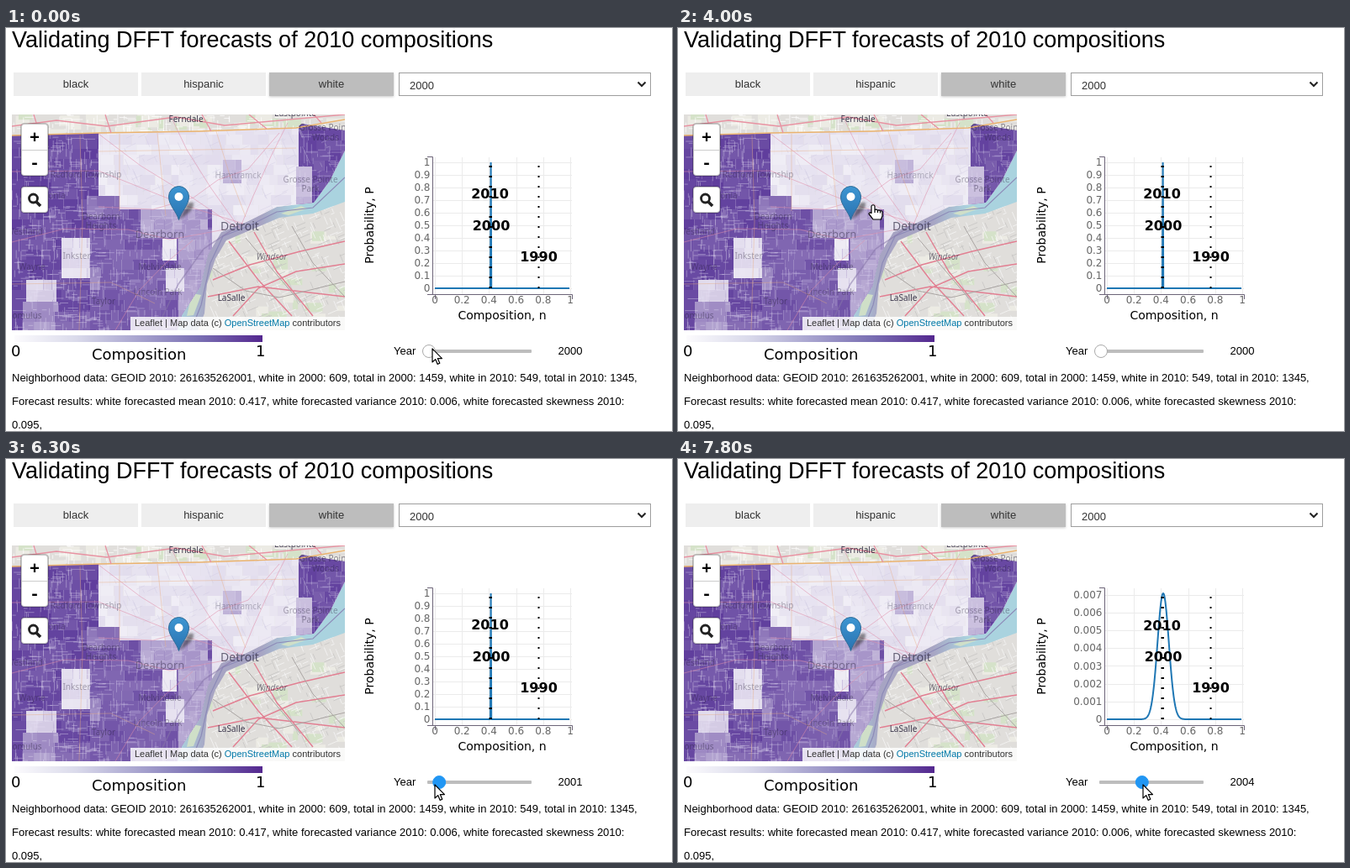
An HTML page with a canvas that plays this animation: 792 px wide and 480 px high, repeating every 8000 ms.

```html
<!DOCTYPE html>
<html lang="en">
<head>
<meta charset="utf-8">
<title>Validating DFFT forecasts</title>
<style>
html, body { margin: 0; width: 100%; height: 100%; overflow: hidden; background: #fff; }
canvas { position: absolute; left: 7px; top: 103px; }
svg { position: absolute; left: 0; top: 0; font: 13px "Liberation Sans", Arial, sans-serif; }
.dj { font-family: "DejaVu Sans", sans-serif; }
.mid { text-anchor: middle; }
.tick { font-size: 12px; fill: #666; }
.mark { font-weight: bold; font-size: 16px; text-anchor: middle; }
.place { font-family: "Noto Sans", sans-serif; text-anchor: middle; }
.btn { fill: #333; text-anchor: middle; }
</style>
</head>
<body>
<canvas id="map" width="396" height="257"></canvas>
<svg width="792" height="480" viewBox="0 0 792 480">
  <defs>
    <linearGradient id="scale"><stop stop-color="#fcfbfd"/><stop offset=".25" stop-color="#dadaeb"/>
      <stop offset=".5" stop-color="#a8a4cf"/><stop offset=".75" stop-color="#796eb2"/><stop offset="1" stop-color="#54278f"/></linearGradient>
    <linearGradient id="pin" x2="0" y2="1"><stop stop-color="#3d96d2"/><stop offset="1" stop-color="#2a72b0"/></linearGradient>
    <filter id="soft" x="-50%" y="-50%" width="200%" height="200%"><feGaussianBlur stdDeviation="1.6"/></filter>
    <clipPath id="mapClip"><rect x="7" y="103" width="396" height="257"/></clipPath>
  </defs>

  <text x="7" y="23" font-size="27">Validating DFFT forecasts of 2010 compositions</text>

  <rect x="9" y="53" width="148" height="28" fill="#eee"/>
  <rect x="161" y="53" width="148" height="28" fill="#eee"/>
  <rect x="313" y="54" width="148" height="28" fill="#777" opacity=".4" filter="url(#soft)"/>
  <rect x="313" y="53" width="148" height="28" fill="#bdbdbd"/>
  <text class="btn" x="83" y="71">black</text>
  <text class="btn" x="235" y="71">hispanic</text>
  <text class="btn" x="387" y="71">white</text>
  <rect x="467.5" y="53.5" width="299" height="27" fill="#fff" stroke="#9e9e9e"/>
  <text x="480" y="73" fill="#333">2000</text>
  <path d="M751.5 64.5l4.5 4.5 4.5-4.5" fill="none" stroke="#222" stroke-width="2"/>

  <g id="places" clip-path="url(#mapClip)"></g>

  <path d="M206 228L216 209Q224 205 223 212Q221 219 206 228Z" fill="#222" opacity=".5" filter="url(#soft)"/>
  <path d="M205.5 228.5C203 219 193.5 211 193.5 201A12 12.5 0 0 1 217.5 201C217.5 211 208 219 205.5 228.5Z" fill="url(#pin)" stroke="#2e6c97"/>
  <circle cx="205.5" cy="201" r="5"  fill="#fff"/>

  <g fill="#fff" stroke="#000" stroke-opacity=".22" stroke-width="2">
    <rect x="18" y="114" width="32" height="62" rx="4"/>
    <rect x="18" y="189" width="32" height="31" rx="4"/>
  </g>
  <path d="M19 145.5H49" stroke="#ccc"/>
  <g class="mid" font-family="Liberation Mono, monospace" font-weight="bold" font-size="20">
    <text x="34" y="137">+</text><text x="34" y="167">-</text>
  </g>
  <g fill="none" stroke="#222"><circle cx="32.5" cy="203" r="5" stroke-width="2.8"/><path d="M36 207l5 5" stroke-width="3.6"/></g>

  <rect x="148" y="344" width="255" height="16" fill="#fff" opacity=".82"/>
  <text x="153" y="355" font-size="11" fill="#333">Leaflet | Map data (c) <tspan fill="#0078a8">OpenStreetMap</tspan> contributors</text>

  <rect x="10" y="366" width="295" height="8" fill="url(#scale)"/>
  <g class="dj" font-size="18"><text x="6" y="391">0</text><text x="297" y="391">1</text><text x="102" y="395">Composition</text></g>

  <path id="grid" fill="none" stroke="#ebebeb"/>
  <g class="dj" id="xTicks"></g>
  <g class="dj" id="yTicks"></g>
  <path d="M501 153.5H507.5V317M501 317.5H673.5V323M510.5 317V323" fill="none" stroke="#6c6478"/>
  <path id="curve" fill="none" stroke="#1f77b4" stroke-width="2"/>
  <path d="M575.5 310V164M577 310V164M633.5 310V164" stroke="#000" stroke-width="2" stroke-dasharray="2 10"/>
  <g class="dj">
    <text id="mark2010" class="mark" x="575.5" y="203">2010</text>
    <text class="mark" x="577" y="241">2000</text>
    <text class="mark" x="633.5" y="278">1990</text>
    <text class="mid" x="590" y="347" font-size="14">Composition, n</text>
    <text class="mid" transform="translate(437 235) rotate(-90)" font-size="14">Probability, P</text>
  </g>

  <text x="461" y="389">Year</text>
  <rect x="501" y="383" width="124" height="4" rx="1" fill="#bdbdbd"/>
  <circle id="knob" cy="385" r="7.5"/>
  <text id="year" x="656.5" y="389"></text>

  <text x="7" y="421">Neighborhood data: GEOID 2010: 261635262001, white in 2000: 609, total in 2000: 1459, white in 2010: 549, total in 2010: 1345,</text>
  <text x="7" y="449">Forecast results: white forecasted mean 2010: 0.417, white forecasted variance 2010: 0.006, white forecasted skewness 2010:</text>
  <text x="7" y="477">0.095,</text>

  <g id="cursor" fill="#fff" stroke="#000" stroke-width="1.2" stroke-linejoin="round">
    <path id="arrow" d="M0 0V16L3.7 12.6L6.2 18.4L8.8 17.3L6.3 11.6H11.5Z"/>
    <path id="hand" d="M-2 9V1Q0-1.5 2 1V6Q4 4 5.5 6.5Q7 5 8.5 7Q11 6 11 9V13Q10 15 9.5 17H0Q-2 14-5 10.5Q-5 8-2 9.5ZM2 6V9M5.5 6.5V9M8.5 7V9.5"/>
  </g>
</svg>
<script>
const $ = id => document.getElementById(id);
const set = (id, attrs) => { for (const k in attrs) $(id).setAttribute(k, attrs[k]); };

// ---- map ----
const ctx = $('map').getContext('2d');
let seed = 11;
const rnd = () => (seed = (seed * 16807) % 2147483647) / 2147483647;

const LAND = 'M7 128L110 125L230 123L345 119L352 114L403 122V146L385 182L366 208L322 213L286 231L256 243L240 270L231 308L209 342L204 360H7Z';
const WATER = 'M403 146L385 182L366 208L322 213L286 231L256 243L240 270L231 308L209 342L204 360H228L236 340L239 305L249 275L262 253L290 241L325 226L365 221L403 207Z';

// areas of the choropleth: x0, y0, x1, y1, share; later ones lie on top
const AREAS = [
  [7, 103, 403, 360, .06], [7, 120, 110, 360, .9], [100, 216, 245, 360, .8], [160, 216, 240, 250, .42],
  [205, 240, 245, 360, .45], [96, 200, 135, 225, .65], [66, 250, 100, 298, .1],
  [24, 300, 60, 326, .16], [20, 326, 62, 360, .5], [186, 251, 203, 277, .04],
  [190, 286, 212, 314, .08], [258, 157, 280, 185, .32], [348, 110, 403, 210, .88],
  [345, 165, 364, 210, .3], [100, 285, 112, 312, .55], [58, 338, 100, 360, .75]
];

function purple(v) {
  const mix = (a, b) => Math.round(a + (b - a) * v);
  return `rgb(${mix(242, 91)} ${mix(240, 57)} ${mix(247, 154)})`;
}
function stroke(d, color, width) {
  ctx.strokeStyle = color;
  ctx.lineWidth = width;
  ctx.stroke(new Path2D(d));
}
function streets(x0, y0, x1, y1, count, color) {
  let d = '';
  for (let i = 0; i < count; i++) {
    const x = x0 + rnd() * (x1 - x0), y = y0 + rnd() * (y1 - y0), len = 4 + rnd() * 12;
    d += `M${x} ${y}` + (rnd() < .5 ? `h${len}` : `v${len}`);
  }
  stroke(d, color, .7);
}
function tracts([x0, y0, x1, y1, base]) {
  for (let y = y0; y < y1; y += 12) {
    for (let x = x0; x < x1;) {
      const w = 8 + rnd() * 14, v = base + (rnd() - .5) * (base > .3 ? .16 : .1);
      ctx.fillStyle = purple(Math.max(0, Math.min(.97, v)));
      ctx.fillRect(x, y, Math.min(w, x1 - x), Math.min(12, y1 - y));
      x += w;
    }
  }
}

function drawMap() {
  ctx.translate(-7, -103);
  ctx.fillStyle = '#e0dedb';
  ctx.fillRect(7, 103, 396, 257);
  for (let i = 0; i < 65; i++) {
    const north = i < 35;
    ctx.fillStyle = rnd() < .4 ? '#d5e2c9' : '#ecebe4';
    ctx.fillRect(north ? 7 + rnd() * 390 : 238 + rnd() * 160, north ? 101 + rnd() * 20 : 232 + rnd() * 110, 6 + rnd() * 18, 4 + rnd() * 12);
  }
  streets(7, 103, 403, 126, 150, '#fff');

  // Windsor: a tilted street grid and main roads
  ctx.save();
  ctx.translate(320, 285);
  ctx.rotate(-.4);
  streets(-95, -85, 100, 85, 330, '#f6f6f6');
  streets(-80, -55, 90, 60, 110, '#c6c4c3');
  ctx.restore();
  stroke('M246 300L290 282L350 266L403 254M270 343L300 310L345 290L403 281M265 254L300 300L340 343M295 243L322 290L365 343M240 320L300 308L403 320', '#e27f92', 1.4);
  stroke('M246 286L285 313L325 321L403 302M285 250L350 327M340 236L365 280L403 320', '#aaa5a3', 1);

  const water = ctx.createLinearGradient(205, 0, 345, 0);
  ['#aad3df', '#a7a4c3', '#a7a4c3', '#aad3df'].forEach((c, i) => water.addColorStop([0, .25, .7, 1][i], c));
  ctx.fillStyle = water;
  ctx.fill(new Path2D(WATER));
  ctx.fillStyle = '#cfdfc8';
  ctx.fill(new Path2D('M327 221L351 212L358 215L336 223ZM221 316L232 318L223 342L215 343Z'));
  stroke('M403 178L365 214L322 219L288 236L258 248L243 280L232 330L220 360', '#8d8bb8', 1.2);

  ctx.save();
  ctx.clip(new Path2D(LAND));
  AREAS.forEach(tracts);
  streets(7, 128, 110, 360, 430, '#e6e0f488');
  streets(100, 215, 240, 360, 260, '#e6e0f477');
  streets(345, 115, 403, 207, 60, '#e6e0f477');
  ctx.translate(230, 170);
  ctx.rotate(-.42);
  streets(-90, -80, 150, 90, 230, '#cbc5de77');
  ctx.restore();

  stroke('M7 128L110 125L230 123L345 119L403 109', '#eab36f', 1.5);
  stroke('M7 171L110 170L160 190L218 213L282 233M110 126L160 164L220 201L273 237M195 103L215 145L244 191L278 239M335 113L315 153L294 200L280 234M110 213L175 216L223 202L252 181L288 168L325 125M7 255L70 239L145 240L195 252L260 240M130 360L158 313L190 280L222 253', '#df8da988', 1);
  stroke('M88 128L91 230L87 360M135 126V218M180 125L190 224M7 305L125 303L177 328M110 147L345 143M250 123L266 175L285 225', '#e8aa7d66', 1);
  stroke('M7 117L60 110L120 117L202 106L260 116L403 103M33 103L40 126M118 103L125 125M233 103L244 123M289 103L310 120M366 103L375 113', '#e892a2', 1.3);
  stroke('M280 233L235 263L205 305L178 360', '#8876aa88', 1.6);
}
drawMap();

// label, x, y, size, strength
const PLACES = [
  ['Ferndale', 214, 112, 10, .85], ['Eastpointe', 344, 105, 10, .75], ['Detroit', 278, 241, 14, .65],
  ['LaSalle', 268, 325, 10, .85], ['Windsor', 316, 276, 10, .55], ['Dearborn', 183, 250, 13, .42],
  ['Hamtramck', 276, 179, 10, .28], ['Grosse Pointe', 362, 184, 10, .35], ['Park', 362, 195, 10, .4],
  ['Grosse Pointe', 381, 122, 10, .5], ['Woods', 380, 134, 10, .4], ['Redford Township', 95, 178, 10, .35],
  ['Livonia', 54, 203, 10, .35], ['Dearborn', 113, 228, 10, .4], ['Heights', 113, 239, 10, .4],
  ['Westland', 22, 246, 10, .35], ['Inkster', 84, 275, 10, .35], ['Wayne', 31, 288, 10, .35],
  ['Melvindale', 183, 288, 10, .4], ['Lincoln Park', 181, 318, 10, .35], ['Taylor', 116, 329, 10, .4], ['Romulus', 22, 346, 10, .4]
];
$('places').innerHTML = PLACES.map(([name, x, y, size, alpha]) =>
  `<text class="place" x="${x}" y="${y}" font-size="${size}" fill="#211b35" fill-opacity="${alpha}"${name === 'Windsor' ? ' font-style="italic"' : ''}>${name}</text>`).join('');

// ---- chart ----
const X0 = 510, W = 161, Y0 = 310, H = 150, MEAN = .416;
const label = v => String(+v.toFixed(4));
$('xTicks').innerHTML = [0, .2, .4, .6, .8, 1].map(v =>
  `<text class="tick mid" x="${X0 + v * W}" y="328">${label(v)}</text>`).join('');

let shown = -1;
function drawChart(n) {
  if (n === shown) return;
  shown = n;
  const max = n ? .01 * Math.sqrt(2 / n) : 1;
  const step = n ? (n < 2 ? .002 : .001) : .1;
  let ticks = '', grid = '', d = `M${X0} ${Y0}`;
  for (let i = 0; i * step <= max * 1.0001; i++) {
    const y = Y0 - i * step / max * H;
    ticks += `<text class="tick" text-anchor="end" x="504.5" y="${y + 4.3}">${label(i * step)}</text>`;
    grid += `M508 ${Math.round(y) + .5}H673`;
  }
  for (let i = 0; i <= 5; i++) grid += `M${Math.round(X0 + i * W / 5) + .5} 154V317`;
  const sigma = .021 * Math.sqrt(n);
  if (n) {
    for (let x = 0; x <= W - 1; x += .5) {
      const z = (x / W - MEAN) / sigma;
      d += `L${X0 + x} ${(Y0 - H * Math.exp(-z * z / 2)).toFixed(2)}`;
    }
  } else d += `H576L576.6 160L577.2 ${Y0}H670`;
  $('yTicks').innerHTML = ticks;
  set('grid', { d: grid });
  set('curve', { d, 'stroke-linejoin': n ? 'round' : 'bevel' });
  set('mark2010', { y: n ? 204 : 203 });
}

// ---- motion ----
// time, x, y of the pointer
const PATH = [
  [0, 507, 382], [900, 507, 382], [1200, 504, 383], [2200, 504, 383], [2300, 485, 374], [2500, 325, 285],
  [2700, 221, 216], [2900, 207, 210], [3000, 207, 210], [3100, 206, 209], [3900, 206, 209],
  [4000, 232, 211], [4100, 232, 211], [4200, 250, 223], [4500, 418, 345], [4700, 477, 384],
  [4800, 498, 387], [4900, 485, 386], [5100, 485, 386], [5200, 503, 386], [5800, 503, 386],
  [6100, 508, 387], [6200, 508, 387], [6300, 510, 388], [6900, 525, 387], [7000, 525, 387],
  [7100, 528, 388], [7200, 528, 388], [7300, 535, 388], [7800, 553, 388], [8000, 553, 388]
];
const passed = (t, times) => times.filter(s => t >= s).length;

function pointer(t) {
  const i = PATH.findIndex(p => p[0] > t), [t0, x0, y0] = PATH[i - 1], [t1, x1, y1] = PATH[i];
  const k = (t - t0) / (t1 - t0);
  return [Math.round(x0 + (x1 - x0) * k), Math.round(y0 + (y1 - y0) * k)];
}

function draw(now) {
  const t = Math.floor(now % 8000 / 100) * 100;
  const n = passed(t, [6300, 6800, 7500, 7700]);
  const active = t >= 200 && t < 2300 || t >= 6300;
  const [x, y] = pointer(t), onMap = x < 403 && y < 360;
  drawChart(passed(t, [6400, 6900, 7600, 7800]));
  set('knob', { cx: 503 + 12.2 * n, fill: active ? '#2196f3' : '#fff', stroke: active ? '#2196f3' : '#aaa' });
  $('year').textContent = 2000 + n;
  set('cursor', { transform: `translate(${x} ${y})` });
  set('arrow', { visibility: onMap ? 'hidden' : 'visible' });
  set('hand', { visibility: onMap ? 'visible' : 'hidden' });
}
function loop() {
  draw(performance.now());
  requestAnimationFrame(loop);
}
loop();
</script>
</body>
</html>
```
